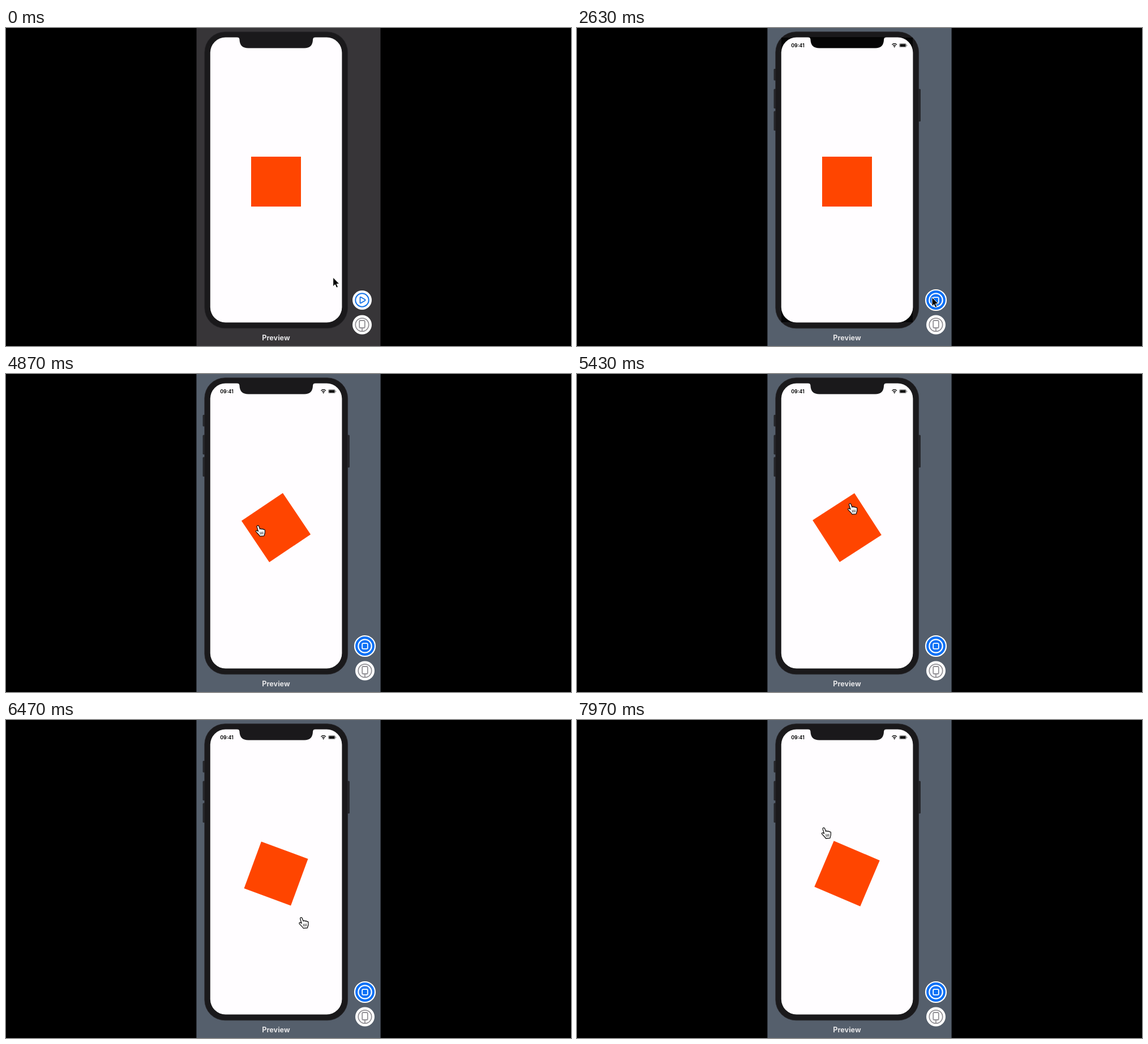
Animation, 998 px wide and 561 px high, one loop 8000 ms. Source, as an HTML page:

```html
<!DOCTYPE html>
<html lang="en">
<head>
<meta charset="utf-8">
<title>Live preview</title>
<style>
  html, body { margin: 0; width: 100%; height: 100%; overflow: hidden; background: #000; }
  svg { display: block; width: 100%; height: 100%; }
  text { font-family: Inter, "Liberation Sans", sans-serif; font-weight: 700; text-anchor: middle; }
</style>
</head>
<body>
<svg viewBox="0 0 998 561">
  <rect width="998" height="561" fill="#000"/>
  <rect x="336.5" width="325" height="561" fill="#373538"/>
  <rect id="liveBg" x="336.5" width="325" height="561" fill="#555f6c"/>

  <g id="sideKeys" fill="#25262a">
    <rect x="347.5" y="72" width="6" height="20.5" rx="1.5"/>
    <rect x="347.5" y="107.5" width="6" height="34.5" rx="1.5"/>
    <rect x="347.5" y="146.5" width="6" height="34.5" rx="1.5"/>
    <rect x="601" y="107.5" width="6" height="57.5" rx="1.5"/>
  </g>
  <rect x="350.8" y="6.8" width="252.8" height="523" rx="36" fill="#1a191b" stroke="#29282b" stroke-width=".8"/>
  <rect id="corners" x="361" y="17" width="232" height="502" fill="#050506"/>
  <rect x="360.8" y="16.5" width="232.6" height="503" rx="27" fill="#fffdff"/>
  <path id="notch" d="M408 16 Q412.5 16.5 412.5 21 Q413 35.5 428 35.5 H527 Q541.5 35.5 542 21 Q542 16.5 546.5 16 Z"/>

  <g id="status" fill="#111">
    <text x="390" y="34" font-size="8.6">09:41</text>
    <g fill="none" stroke="#111" stroke-width="1.4">
      <path d="M556.4 29.4 Q560.7 25.6 565 29.4"/>
      <path d="M558.2 31.5 Q560.7 29.3 563.2 31.5"/>
    </g>
    <circle cx="560.7" cy="33.2" r="1.1"/>
    <rect x="569.4" y="27.4" width="12.2" height="6.4" rx="1.7" fill="none" stroke="#777" stroke-width=".7"/>
    <rect x="570.4" y="28.3" width="10.2" height="4.6" rx="1"/>
    <rect x="582.3" y="29.5" width="1" height="2.3" rx=".5" fill="#777"/>
  </g>

  <rect id="badge" x="-44" y="-44" width="88" height="88" fill="#ff4500"/>

  <text x="477" y="551" font-size="12.6" fill="#e4e4e6">Preview</text>

  <g id="play" transform="translate(629 480)" fill="none" stroke="#1272e8" stroke-width="2">
    <circle r="17" fill="#fff" stroke="none"/>
    <circle r="11.7"/>
    <path d="M-3.5 -4.5 Q-3.5 -5.8 -2.2 -5.2 L5 -.9 Q6.3 0 5 .9 L-2.2 5.2 Q-3.5 5.8 -3.5 4.5 Z" stroke-width="1.8"/>
  </g>
  <g id="stop" transform="translate(634 480)" fill="none" stroke="#fff" stroke-width="2.2">
    <circle r="18" fill="#0a70f5"/>
    <circle r="11.7"/>
    <rect x="-4.8" y="-4.8" width="9.6" height="9.6" rx="1.8" stroke-width="1.8"/>
  </g>
  <g id="device" fill="none" stroke="#929095" stroke-width="1.8">
    <circle r="17" fill="#fff" stroke="none"/>
    <circle r="11.7"/>
    <rect x="-4.8" y="-7.5" width="9.6" height="13" rx="1.7" fill="#fff"/>
    <path d="M0 5.5 V11.5"/>
  </g>

  <path id="arrow" d="M0 0 V16 L3.6 12.6 L6 18.2 L8.8 17 L6.4 11.6 H11.3 Z" fill="#000" stroke="#fff"/>
  <g id="finger" stroke="#111" stroke-width="1.3" stroke-linejoin="round" stroke-linecap="round">
    <path fill="#fff" d="M-1.8 2 C-2.2 -.5 .9 -1.2 1.7 1 L3.7 6.2
      C4.5 4.7 6.5 5 6.9 6.4 C7.7 5.3 9.5 5.6 9.9 7 C11 6.2 12.5 7 12.5 8.4
      C13 12 12.4 14 10.9 18 L3.6 18.6 C2.2 15.8 -1.2 13.4 -3.2 10.8
      C-4.3 9.2 -2.6 7.7 -.9 8.9 L.6 10 Z"/>
    <path fill="none" stroke-width=".9" d="M3.8 11.4 L4.5 15.2 M6.3 11.2 L6.7 15 M8.8 11 L8.9 14.8"/>
  </g>
</svg>
<script>
const LOOP = 8000, GRAB = 4620;
const center = { x: 477, y: 271 };
const el = id => document.getElementById(id);
const ramp = (t, from, to) => Math.min(1, Math.max(0, (t - from) / (to - from)));
const ease = (t, from, to) => {
  const u = ramp(t, from, to);
  return u * u * (3 - 2 * u);
};
const mix = (a, b, u) => a + (b - a) * u;

// The drag turns the badge quickly at first, then slows a little
const spin = t => 147 * (Math.max(0, t - GRAB) / 810) ** 0.823;

// While dragging, the pointer keeps its angle to the badge on a widening oval
function orbit(t) {
  const a = (spin(t) - 230) * Math.PI / 180;
  const r = (84 - 11 * Math.cos(2 * a)) * mix(0.44, 1, ease(t, 5350, 6400));
  return { x: center.x + r * Math.cos(a), y: center.y + r * Math.sin(a) };
}

// Rest, play button, badge, short drift, drag
function pointer(t) {
  const moves = [
    [100, 750, { x: 627, y: 475 }],
    [2850, 3500, { x: 481, y: 246 }],
    [3930, 4330, { x: 451, y: 228 }],
    [4600, 4850, orbit(t)]
  ];
  return moves.reduce((p, [from, to, goal]) => {
    const u = ease(t, from, to);
    return { x: mix(p.x, goal.x, u), y: mix(p.y, goal.y, u) };
  }, { x: 577.7, y: 440 });
}

const fade = (id, v) => el(id).setAttribute("opacity", v);
const place = (id, x, y, turn = 0) =>
  el(id).setAttribute("transform", `translate(${x} ${y}) rotate(${turn})`);

function draw(t) {
  const live = ramp(t, 950, 1300);
  fade("liveBg", live);
  fade("sideKeys", live);
  fade("stop", live);
  fade("play", 1 - live);
  place("device", 629 + 5 * live, 523.5);
  fade("status", ramp(t, 1700, 1800));

  const dark = ramp(t, 1250, 1350) * (1 - ramp(t, 2750, 3000));
  fade("corners", dark);
  el("notch").setAttribute("fill", `rgb(${[26, 25, 27].map(c => mix(c, 5, dark))})`);

  place("badge", center.x, center.y, spin(t));

  const { x, y } = pointer(t);
  const touching = t >= 3430;
  place("arrow", x, y);
  place("finger", x, y);
  fade("arrow", touching ? 0 : 1);
  fade("finger", touching ? 1 : 0);
}

const start = performance.now();
function tick() {
  draw((performance.now() - start) % LOOP);
  requestAnimationFrame(tick);
}
tick();
</script>
</body>
</html>
```
